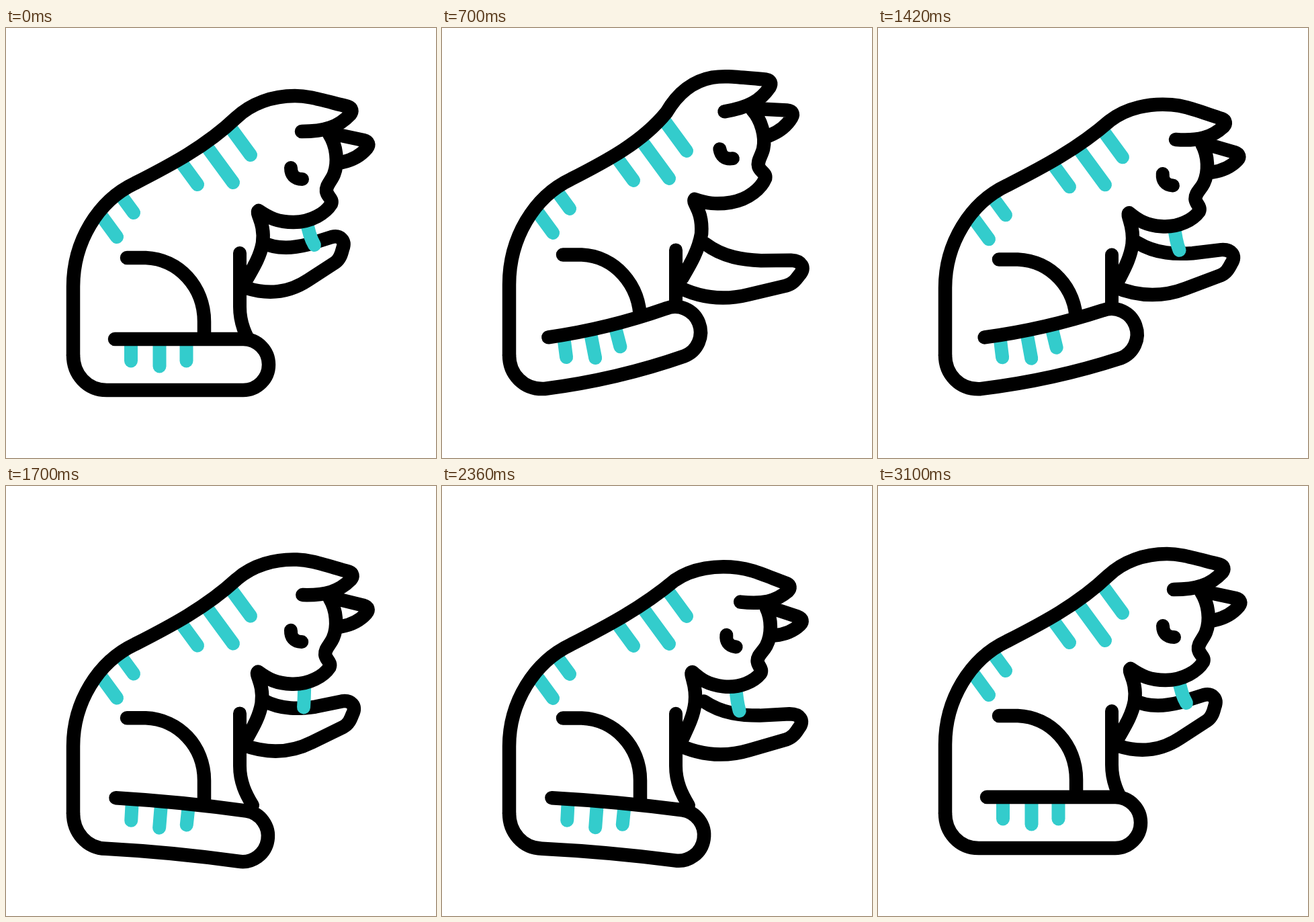
Write an HTML page with a canvas that moves like this. It is 640 px wide and 640 px high and loops after 3440 ms.

```html
<!DOCTYPE html>
<html lang="en">
<head>
<meta charset="utf-8">
<title>Cat washing its paw</title>
<style>
  html, body { margin: 0; width: 100%; height: 100%; overflow: hidden; background: #fff; }
  canvas { display: block; width: 100vw; height: 100vh; }
</style>
</head>
<body>
<canvas id="stage" width="640" height="640"></canvas>
<script>
const ctx = document.getElementById('stage').getContext('2d');
const LOOP = 3440, BEGIN = 220, END = 3100;
const INK = '#000', TEAL = '#33cccc', WHITE = '#fff';

// The cat at rest; every pose is a warp of these outlines
const BACK = 'M100,487 L100,385 C100,318 137,257 192,231 C245,204 298,176 342,134 ' +
  'C365,112 397,101 430,101 C450,101 465,106 509,117 C515,119 516,124 512,129 C495,147 475,154 440,154';
const FACE = 'M481,158 C492,175 495,200 488,218 C484,228 476,234 477,243 C478,251 487,254 484,262 ' +
  'C476,275 455,289 428,289 C405,289 392,283 376,272 C371,276 386,290 382,320 C378,342 366,360 357,376';
const EAR = 'M485,157 L532,167 C540,169 541,174 537,179 C527,191 514,197 500,200';
const EYE = 'M424,208 C424,218 429,225 441,225';
const PAW = 'M378,318 C405,331 430,327 450,322 L485,311 C497,308 506,316 501,329 ' +
  'C499,337 497,344 490,349 L450,375 C420,395 390,397 358,387';
const TAIL = 'M162,463 C225,463 287,463 353,463 C374,463 391,480 391,501 C391,522 374,539 353,539 ' +
  'C287,539 220,539 150,539 C120,539 100,515 100,487';
const HAUNCH = 'M180,342 L208,342 C257,344 295,385 295,437 L295,470';
const FORELEG = 'M348,335 L348,415 C348,440 357,458 367,475';

const clamp = (v, lo = 0, hi = 1) => Math.min(hi, Math.max(lo, v));
const ease = u => (1 - Math.cos(Math.PI * clamp(u))) / 2;
const ramp = (t, from, to) => ease((t - from) / (to - from));

// Swings from one turning point [time, value] to the next
function swing(t, ...turns) {
  let value = turns[0][1];
  for (let i = 1; i < turns.length; i++) {
    const [t0, v0] = turns[i - 1], [t1, v1] = turns[i];
    value += (v1 - v0) * ramp(t, t0, t1);
  }
  return value;
}

function tailLift(t) {
  const first = 695, last = 2735, period = 680;
  const wave = 13.5 + 33.5 * Math.cos(2 * Math.PI * (clamp(t, first, last) - first) / period);
  return wave * ramp(t, BEGIN, first) * (1 - ramp(t, last, END));
}

function rotate(x, y, a) {
  const c = Math.cos(a), s = Math.sin(a);
  return [x * c - y * s, x * s + y * c];
}

const warp = (d, move) =>
  new Path2D(d.replace(/([\d.]+),([\d.]+)/g, (_, x, y) => move(+x, +y).join()));

// Breathing: the feet stay, the back rises and sinks
const bobbing = dy => (x, y) => [x, y + dy * clamp((487 - y) / 200)];

// The head turns about the chin; its pull fades along neck and chest
function nodding(h, bob) {
  const nod = Math.max(h, 0), size = 1 - .07 * nod;
  return (x, y) => {
    const [rx, ry] = rotate((x - 376) * size, (y - 271) * size, .15 * h);
    const pull = clamp((x - 310) / 90) * clamp((380 - y) / 90);
    const [bx, by] = bob(x, y);
    return [
      bx + pull * (376 + rx - 6 * nod - x),
      by + pull * (271 + ry + 14 * Math.min(h, 0) - y)
    ];
  };
}

// Bends the tail into an arc, with a straight tip
function bending(lift) {
  const root = 100, axis = 501, curl = lift / 31250;
  return (x, y) => {
    const s = Math.max(x - root, 0), arc = Math.min(s, 252), a = curl * arc;
    const [dx, dy] = rotate(s - arc, y - axis, -a);
    return [Math.min(x, root) + arc * (1 - a * a / 6) + dx, axis - arc * a / 2 + dy];
  };
}

// The foreleg swings at the shoulder and stretches forward
const reaching = (degrees, reach) => (x, y) => {
  const [dx, dy] = rotate(x - 372, y - 355, degrees * Math.PI / 180);
  return [372 + dx * reach, 355 + dy];
};

function stroke(path, color = INK, width = 20.5) {
  ctx.strokeStyle = color;
  ctx.lineWidth = width;
  ctx.stroke(path);
}
function fill(path) {
  ctx.fillStyle = WHITE;
  ctx.fill(path);
}
function stripes(area, list, move) {
  ctx.save();
  ctx.clip(area);
  for (const [x, y, dx, dy] of list) stroke(warp(`M${x - dx},${y - dy} L${x},${y}`, move), TEAL, 20);
  ctx.restore();
}

const bodyStripes = [[165, 311], [190, 275], [285, 233], [338, 230], [364, 189]].map(p => [...p, 44, 60]);
const tailStripes = [[186, 495.5], [228.5, 503.5], [268.5, 495.5]].map(p => [...p, 0, 50]);

function draw(t) {
  const h = swing(t, [BEGIN, 0], [490, -2.2], [1010, 1], [1700, .2], [2370, .75], [END, 0]);
  const dy = swing(t, [BEGIN, 0], [560, -6.5], [1650, 4.5], [2300, 5], [END, 0]);
  const angle = swing(t, [BEGIN, 0], [690, 17], [1000, -3], [1440, 9.5], [1960, 0], [2390, 14], [END, 0]);
  const reach = swing(t, [BEGIN, 1], [690, 1.22], [1000, 1.13], [1440, 1.17], [1960, 1.03], [2390, 1.21], [END, 1]);
  const lick = swing(t, [BEGIN, 12], [980, -21], [1430, 8], [1960, -10], [2390, 6], [END, 12]);
  const out = swing(t, [BEGIN, 1], [480, 0], [660, 0], [960, 1]);

  const bob = bobbing(dy), head = nodding(h, bob), bend = bending(tailLift(t));

  ctx.fillStyle = WHITE;
  ctx.fillRect(0, 0, 640, 640);
  ctx.lineCap = ctx.lineJoin = 'round';

  stroke(warp(EAR, head));
  stroke(warp(PAW, reaching(angle, reach)));

  const [mx, my] = head(447, 285);
  const tongue = new Path2D();
  tongue.moveTo(mx, my);
  tongue.quadraticCurveTo(mx + .35 * lick, my + 25 * out, mx + lick, my + 38 * out);
  stroke(tongue, TEAL, 20);

  const torso = warp(BACK + FACE.replace('M', 'L'), head);
  torso.lineTo(348, 470);
  torso.lineTo(100, 487);
  fill(torso);
  stripes(torso, bodyStripes, (x, y) => [x, y + dy]);
  stroke(warp(HAUNCH, bob));
  stroke(warp(FORELEG, bob), INK, 20);

  const tail = warp(TAIL, bend);
  fill(tail);
  stripes(tail, tailStripes, bend);
  stroke(tail);

  stroke(warp(BACK, head));
  stroke(warp(FACE, head));
  stroke(warp(EYE, head), INK, 20);
}

const start = performance.now();
function tick() {
  draw((performance.now() - start) % LOOP);
  requestAnimationFrame(tick);
}
tick();
</script>
</body>
</html>
```
